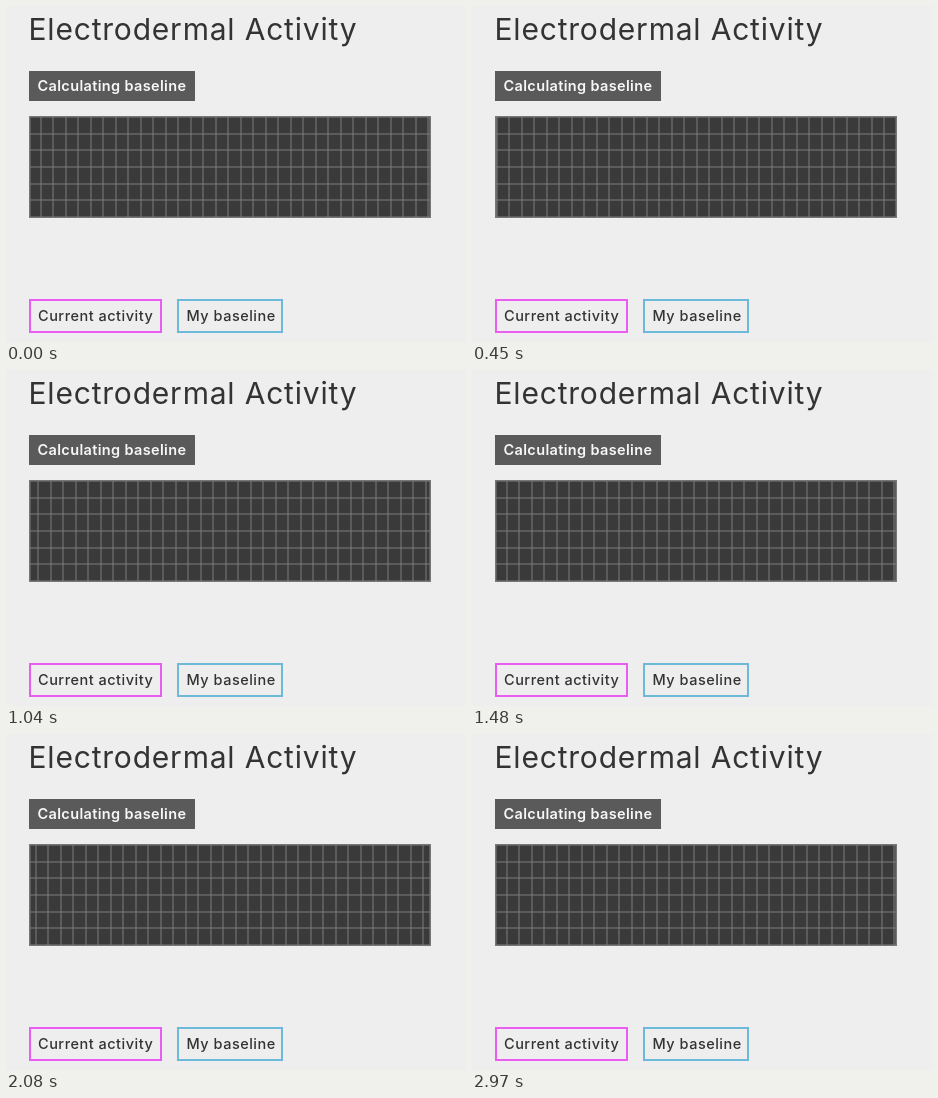
Write an HTML page that moves like this. It is 460 by 336 pixels and loops after 3070 ms.

```html
<!DOCTYPE html>
<html lang="en">
<head>
<meta charset="utf-8">
<title>Electrodermal Activity</title>
<style>
  html, body { margin: 0; width: 100%; height: 100%; overflow: hidden; background: #eee; }
  svg { display: block; }
  text { font: 450 14.5px Inter, "Open Sans", sans-serif; letter-spacing: .5px; fill: #333; }
  .title { font-size: 30px; font-weight: 400; letter-spacing: .8px; }
  .status { font-weight: 600; letter-spacing: .35px; fill: #f7f7f7; }
  .key { fill: none; stroke-width: 2; }
  .grid { fill: none; stroke: #7c7c7c; stroke-width: 1; }
</style>
</head>
<body>
<svg width="460" height="336" viewBox="0 0 460 336">
  <text class="title" x="22.5" y="34">Electrodermal Activity</text>

  <rect x="23" y="65" width="166" height="30" fill="#5a5a5a"/>
  <text class="status" x="31.5" y="85">Calculating baseline</text>

  <rect x="23" y="110" width="402" height="102" fill="#777"/>
  <svg x="24" y="111" width="400" height="100">
    <rect width="400" height="100" fill="#3a3a3a"/>
    <path id="columns" class="grid"/>
    <path id="rows" class="grid"/>
    <rect class="grid" width="400" height="100"/>
  </svg>

  <rect class="key" x="24" y="294" width="131" height="32" stroke="#ea5df3"/>
  <text x="32" y="315">Current activity</text>
  <rect class="key" x="172" y="294" width="104" height="32" stroke="#6cb9d8"/>
  <text x="180.5" y="315">My baseline</text>
</svg>
<script>
const LOOP = 3070, STEP = 148.5, FIRST_CHANGE = 141.5;
const WIDTH = 400, HEIGHT = 100, COLUMN = 12.5, ROWS = 6;
const START = 1.75, SHIFT = 7.51; // distance from the right edge, and scroll per step

const columns = document.getElementById("columns");
const rows = document.getElementById("rows");

let rowPath = "";
for (let i = 1; i < ROWS; i++) rowPath += `M0 ${Math.round(i * HEIGHT / ROWS)}h${WIDTH}`;
rows.setAttribute("d", rowPath);

// The grid scrolls left in even steps; its lines snap to whole pixels.
function draw(time) {
  const step = Math.floor((time % LOOP - FIRST_CHANGE) / STEP) + 1;
  const offset = (START + SHIFT * step) % COLUMN;
  let path = "";
  for (let d = offset; d <= WIDTH; d += COLUMN) path += `M${WIDTH - Math.round(d)} 0v${HEIGHT}`;
  columns.setAttribute("d", path);
}

function tick() {
  draw(performance.now());
  requestAnimationFrame(tick);
}
tick();
</script>
</body>
</html>
```
